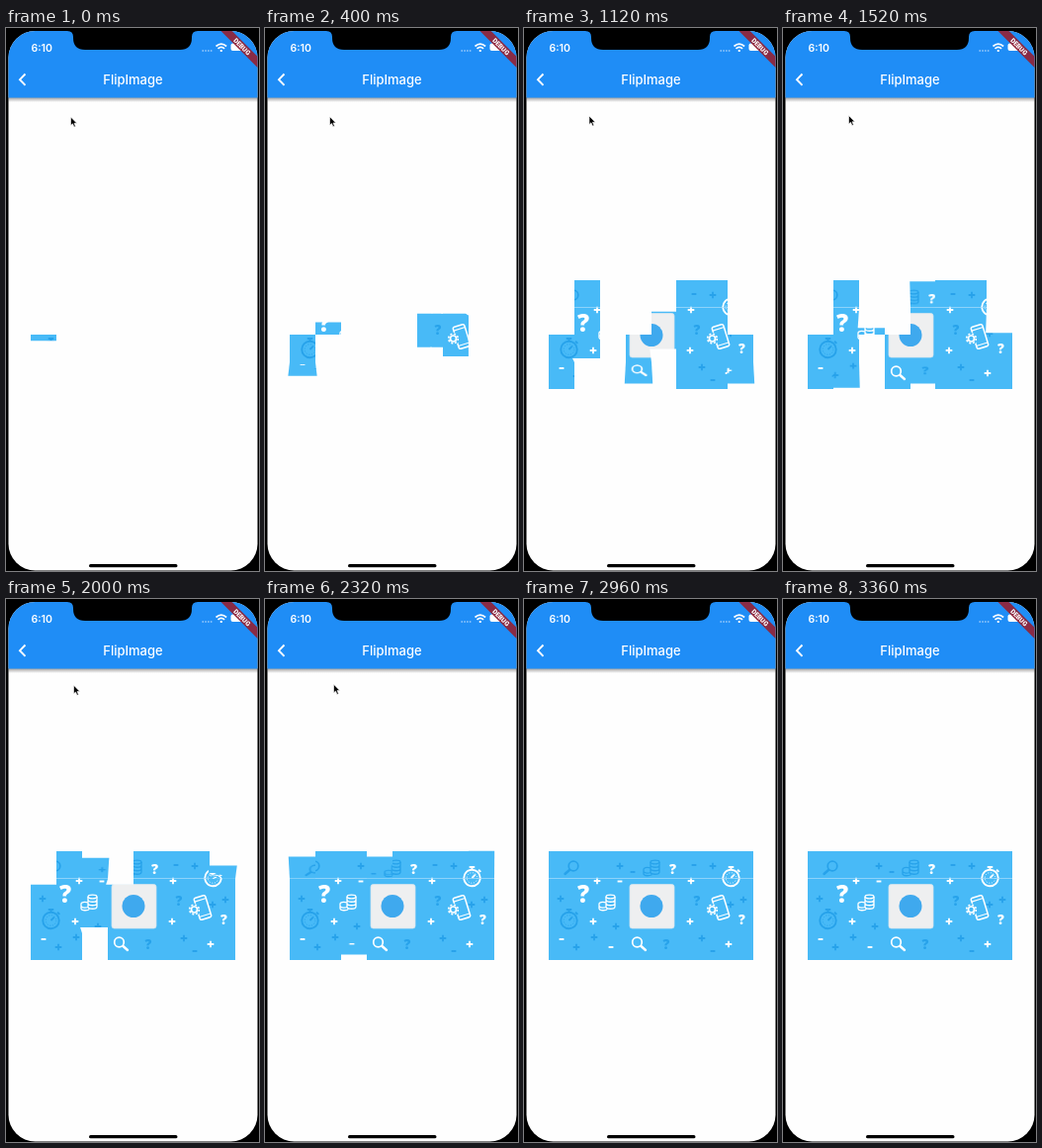
Recreate the animation shown at these times as an HTML page. Size 256 by 549 pixels, loop 3440 ms.

```html
<!DOCTYPE html>
<html lang="en">
<head>
<meta charset="utf-8">
<title>Flip image</title>
<style>
  html, body { margin: 0; width: 100%; height: 100%; overflow: hidden; background: #000; }
  #stage { position: relative; width: 256px; height: 549px; overflow: hidden; }
  #stage > svg, .half { position: absolute; display: block; }
  .old { background: #fefefe; }
</style>
</head>
<body>
<div id="stage">
  <svg id="phone" width="256" height="549" viewBox="0 0 256 549">
    <defs>
      <clipPath id="screen"><rect x="2.5" y="3" width="252" height="545.5" rx="27"/></clipPath>
      <linearGradient id="shade" x2="0" y2="1">
        <stop stop-color="#000" stop-opacity=".38"/>
        <stop offset="1" stop-color="#000" stop-opacity="0"/>
      </linearGradient>
      <g id="coins" fill="none" stroke-width="1.3">
        <path d="M-1-6v10c0 3 9 3 9 0v-10M-1-3c0 3 9 3 9 0M-1 0.500c0 3 9 3 9 0"/>
        <ellipse cx="3.500" cy="-6" rx="4.500" ry="1.800"/>
        <path d="M-1 0c-4-1.500-7 0-7 1.300v4.500c0 2.500 7 2.500 8.500.5M-8 3.500c1 2 5 2 7 1"/>
      </g>
      <g id="watch" fill="none" stroke-width="1.7">
        <circle r="7.500"/><circle r="4.800" stroke-width=".8" stroke-dasharray="1 1.500"/>
        <path d="M0 0l3-3M-2.500-10h5M0-10v2M6-7.500l2 2"/>
      </g>
      <g id="lens" fill="none" stroke-linecap="round">
        <circle r="4.800" stroke-width="1.700"/><path d="M4 4l4.500 4" stroke-width="2.400"/>
      </g>
      <g id="art"></g>
    </defs>
    <rect width="256" height="549"/>
    <g clip-path="url(#screen)">
      <rect width="256" height="549" fill="#fefefe"/>
      <rect y="70" width="256" height="5" fill="url(#shade)"/>
      <rect width="256" height="70.500" fill="#1f8df6"/>
      <g fill="#fff" font-family="Inter, 'Liberation Sans', sans-serif" font-weight="600">
        <text x="25.500" y="23.500" font-size="10.500">6:10</text>
        <text x="128.500" y="56.500" font-size="13" font-weight="500" text-anchor="middle">FlipImage</text>
        <rect x="227.500" y="15.500" width="14" height="7.500" rx="2"/>
      </g>
      <path d="M198.500 23h10" stroke="#9fcdfb" stroke-width="1.300" stroke-dasharray="1.500 1.300"/>
      <g fill="none" stroke="#fff" stroke-width="1.700">
        <path d="M212.500 18.500q5.300-4.600 10.600 0M214.500 20.800q3.300-2.800 6.600 0"/>
        <path d="M217.800 22v2" stroke-width="2"/>
        <path d="M19.500 46.500l-5.500 5.700 5.500 5.700" stroke-width="1.900"/>
      </g>
      <g transform="translate(254.500 3) rotate(45)">
        <rect x="-40" y="18.200" width="80" height="8" fill="#922438" fill-opacity=".93"/>
        <text y="24.600" font-size="6.600" font-weight="900" fill="#fff" text-anchor="middle"
          font-family="Roboto, 'Liberation Sans', sans-serif">DEBUG</text>
      </g>
      <rect x="84" y="542" width="89.500" height="3.300" rx="1.650"/>
    </g>
    <path d="M62 0v3q6 0 6 6v1q0 12 12 12h96q12 0 12-12v-1q0-6 6-6v-3z"/>
    <path id="cursor" d="M0 0v8.600l2-1.800 1.400 3.300 1.500-.6-1.400-3.200h2.700z" fill="#000" stroke="#fff" stroke-width=".6"/>
  </svg>
</div>
<script>
const LOOP = 3440, STEP = 80, PHASE = 500;
const DARK = '#27a2ea', WHITE = '#fff';
const $ = id => document.getElementById(id);

// --- the picture that the tiles reveal ---
const plus = (x, y, color, r = 3.3) =>
  `<path d="M${x - r} ${y}h${2 * r}M${x} ${y - r}v${2 * r}" stroke="${color}" stroke-width="1.8"/>`;
const minus = (x, y, color) =>
  `<path d="M${x - 2.4} ${y}h4.8" stroke="${color}" stroke-width="1.9"/>`;
const query = (x, y, size, color) =>
  `<text x="${x}" y="${y + size * .36}" font-size="${size}" fill="${color}">?</text>`;
const icon = (id, x, y, color, extra = '') =>
  `<use href="#${id}" stroke="${color}" transform="translate(${x} ${y}) ${extra}"/>`;
const marks = (draw, color, points) => points.map(([x, y]) => draw(x, y, color)).join('');

$('art').innerHTML = `
  <rect x="15" y="245" width="227" height="130" fill="#48baf7"/>
  ${marks(plus, DARK, [[97, 270], [191, 270], [37, 303], [93, 331], [53, 352], [71, 342], [180, 343], [209, 309], [222, 304]])}
  ${marks(plus, WHITE, [[74, 285], [169, 285], [70, 326], [168, 326], [207, 349]])}
  ${marks(minus, DARK, [[110, 276], [172, 269], [191, 356]])}
  ${marks(minus, WHITE, [[97, 285.5], [38, 344], [88, 352]])}
  <g font-family="'Open Sans', 'Noto Sans', sans-serif" font-weight="800" text-anchor="middle">
    ${query(60, 298, 24, WHITE)}${query(150.500, 273, 14, WHITE)}${query(220.500, 324, 13.500, WHITE)}
    ${query(144, 349, 13.500, DARK)}${query(175, 305, 13.500, DARK)}
  </g>
  ${icon('lens', 50, 270, DARK, 'scale(-1 1)')}${icon('lens', 114.500, 347, WHITE)}
  ${icon('coins', 129, 272, DARK)}${icon('coins', 84, 307, WHITE)}
  ${icon('watch', 45.500, 325, DARK, 'scale(1.1)')}${icon('watch', 209.500, 282, WHITE, 'scale(1.1)')}
  <g transform="translate(199 312) rotate(-17)" fill="none" stroke="#fff" stroke-width="1.500">
    <rect x="-6" y="-11.500" width="12" height="23" rx="1.800"/>
    <path d="M-6-8h12M-6 8h12" stroke-width="1.100"/>
  </g>
  <circle cx="190.500" cy="314" r="6.300" fill="#48baf7"/>
  <circle cx="190.500" cy="314" r="4.800" fill="none" stroke="#fff" stroke-width="1.600" stroke-dasharray="2 1.770"/>
  <circle cx="190.500" cy="314" r="3" fill="none" stroke="#fff" stroke-width="1.700"/>
  <rect x="107" y="288.500" width="45" height="44.500" rx="2.500" fill="#eeeff0" stroke="#d3e4ee" stroke-width=".8"/>
  <circle cx="129" cy="310.500" r="11.500" fill="#3fa9ee"/>
  <path d="M15 282.600h227" stroke="#a9defb" stroke-width=".8"/>`;

// --- tiles: each panel opens away from the middle line of the picture ---
const columnX = i => Math.round(25 + i * 25.875);
const rowY = [255, 283, 310, 338, 365];
const starts = [
  [1560, 60, 1260, 1560, 660, -40, -40, 1360],
  [-250, 660, 1560, 360, 760, 60, -40, 360],
];

function half(col, row, filled) {
  const x = columnX(col), y = rowY[row], w = columnX(col + 1) - x, h = rowY[row + 1] - y;
  const box = document.createElement('div');
  box.className = filled ? 'half' : 'half old';
  box.style.cssText = `left:${x}px;top:${y}px;width:${w}px;height:${h}px`;
  if (filled) {
    box.innerHTML = `<svg style="display:block" width="${w}" height="${h}" viewBox="${x} ${y} ${w} ${h}"><use href="#art"/></svg>`;
  }
  $('stage').append(box);
  return box;
}

const panels = starts.flatMap((list, side) => list.map((start, col) => {
  const inner = side ? 2 : 1, outer = side ? 3 : 0;
  return { start, side, base: half(col, inner, true), cover: half(col, inner, false), flap: half(col, outer, true) };
}));

const show = (el, on) => { el.style.display = on ? 'block' : 'none'; };

function fold(el, upward, angle) {
  el.style.transformOrigin = upward ? '50% 100%' : '50% 0';
  el.style.transform = angle > 0 ? `perspective(215px) rotateX(${upward ? -angle : angle}rad)` : 'none';
}

function drawPanel({ start, side, base, cover, flap }, time) {
  const turn = Math.min(2, (time - start) / PHASE);
  const opening = turn > 0 && turn < 1;
  show(base, turn > 0);
  show(cover, opening);
  show(flap, turn > 1);
  if (opening) fold(cover, side === 1, turn * Math.PI / 2);
  if (turn > 1) fold(flap, side === 0, (2 - turn) * Math.PI / 2);
}

// --- pointer ---
const trail = [[0, 65.5, 90], [800, 65.5, 89.3], [1520, 66.5, 88.5], [2000, 68.5, 87.2], [2320, 69.5, 86.3], [2640, 70.5, 85.6]];

function drawCursor(time) {
  const next = trail.findIndex(p => p[0] > time);
  show($('cursor'), next > 0);
  if (next < 1) return;
  const [t0, x0, y0] = trail[next - 1], [t1, x1, y1] = trail[next];
  const k = (time - t0) / (t1 - t0);
  $('cursor').setAttribute('transform', `translate(${x0 + (x1 - x0) * k} ${y0 + (y1 - y0) * k})`);
}

function draw(now) {
  const t = now % LOOP;
  const time = t < 2 * STEP ? 0 : Math.floor(t / STEP) * STEP;
  panels.forEach(panel => drawPanel(panel, time));
  drawCursor(time);
}

const begin = performance.now();
function tick() {
  draw(performance.now() - begin);
  requestAnimationFrame(tick);
}
tick();
</script>
</body>
</html>
```
